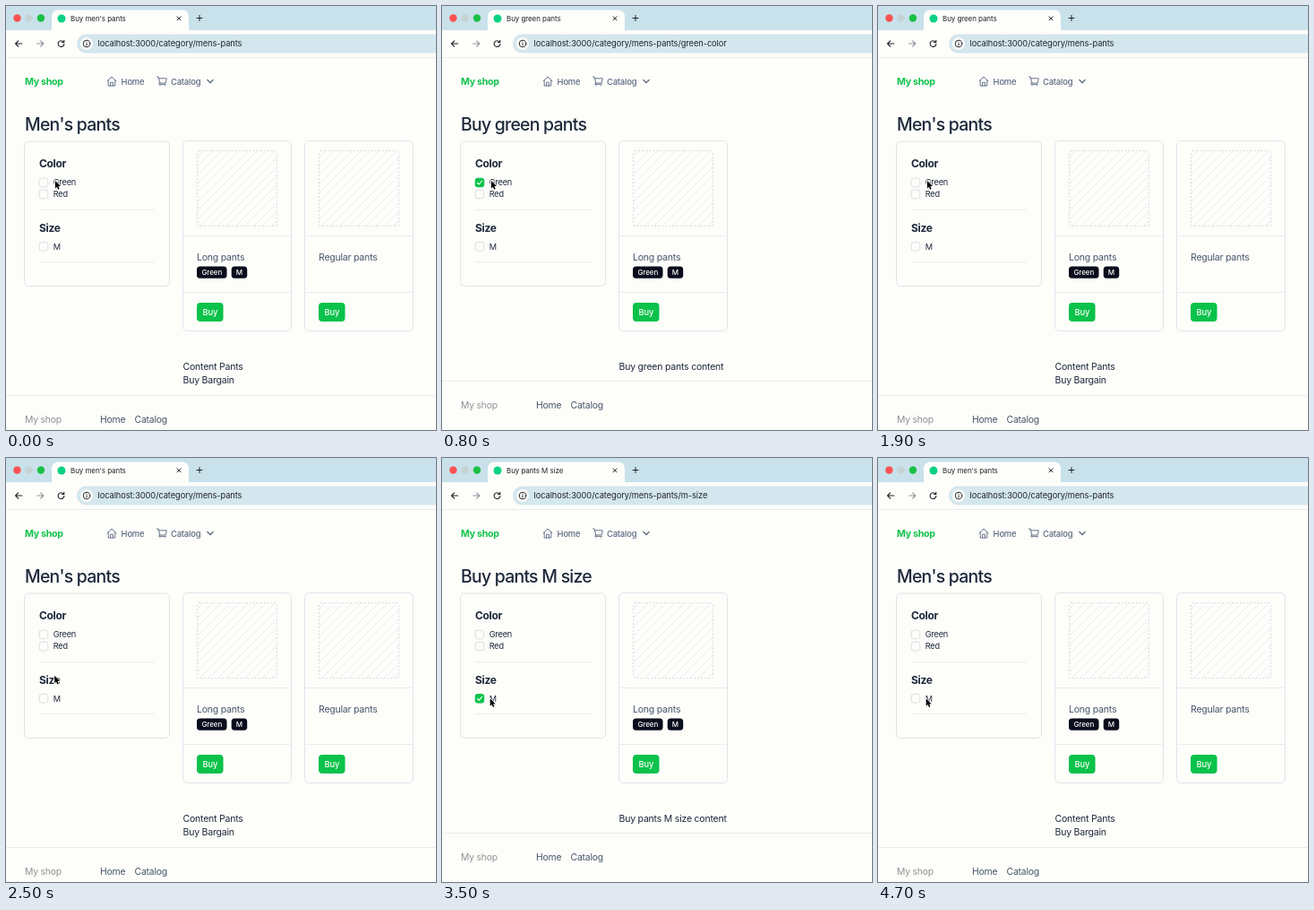
Write an HTML page with a canvas that moves like this. It is 480x473 px and loops after 4800 ms.

```html
<!DOCTYPE html>
<html lang="en">
<head>
<meta charset="utf-8">
<title>Shop filters</title>
<style>
html, body { margin: 0; width: 100%; height: 100%; overflow: hidden; background: #fdfdfa; }
canvas { display: block; width: 480px; height: 473px; }
</style>
</head>
<body>
<canvas id="stage"></canvas>
<script>
const W = 480, H = 473, LOOP = 4800;
const canvas = document.getElementById('stage');
const ctx = canvas.getContext('2d');
const ratio = window.devicePixelRatio || 1;
canvas.width = W * ratio;
canvas.height = H * ratio;

const PAGE = '#fdfdfa', STRIP = '#c9e1eb', FIELD = '#d4e6ee';
const LINE = '#e8ebf0', EDGE = '#dfe4ea';
const CHROME = '#1f2328', INK = '#1e293b', NAV = '#5a6880', SOFT = '#475569', MUTED = '#8f9396';
const GREEN = '#0bc24a', LIGHT = '#fbfdfb';

const PAGES = {
  all: { title: "Buy men's pants", head: "Men's pants", path: '', body: ['Content Pants', 'Buy Bargain'] },
  green: { title: 'Buy green pants', head: 'Buy green pants', path: '/green-color', body: ['Buy green pants content'] },
  size: { title: 'Buy pants M size', head: 'Buy pants M size', path: '/m-size', body: ['Buy pants M size content'] }
};

// [time, value] steps; the last one reached applies
const VIEW = [[0, 'all'], [400, 'green'], [1900, 'all'], [3200, 'size'], [4400, 'all']];
const TITLE = [[0, 'all'], [400, 'green'], [2000, 'all'], [3200, 'size'], [4500, 'all']];
const CHECK = [[0, ''], [300, 'Green'], [1800, ''], [2900, 'M'], [4300, '']];

const at = (steps, t) => steps.filter(s => s[0] <= t).pop()[1];

function text(str, x, y, size, color, weight = 400, gap = -0.02) {
  ctx.font = `${weight} ${size}px Inter, "Open Sans", sans-serif`;
  ctx.letterSpacing = gap * size + 'px';
  ctx.fillStyle = color;
  ctx.fillText(str, x, y);
}

function box(x, y, w, h, r, fill, stroke) {
  ctx.beginPath();
  ctx.roundRect(x, y, w, h, r);
  if (fill) { ctx.fillStyle = fill; ctx.fill(); }
  if (stroke) { ctx.strokeStyle = stroke; ctx.lineWidth = 1; ctx.stroke(); }
}

function dot(x, y, r, color) {
  ctx.beginPath();
  ctx.arc(x, y, r, 0, Math.PI * 2);
  ctx.fillStyle = color;
  ctx.fill();
}

function path(d, color, width = 1, x = 0, y = 0) {
  ctx.save();
  ctx.translate(x, y);
  ctx.strokeStyle = color;
  ctx.lineWidth = width;
  ctx.lineCap = ctx.lineJoin = 'round';
  ctx.stroke(new Path2D(d));
  ctx.restore();
}

function rule(x1, x2, y) {
  ctx.fillStyle = LINE;
  ctx.fillRect(x1, y, x2 - x1, 1);
}

function browser(page, title) {
  ctx.fillStyle = STRIP;
  ctx.fillRect(0, 0, W, 27);
  dot(12.5, 13.5, 4.2, '#fb5252');
  dot(25.5, 13.5, 4.2, '#c6d3d2');
  dot(39, 13.5, 4.2, '#19c043');
  box(51, 4.5, 153, 24, [7, 7, 0, 0], PAGE);
  dot(62, 14, 4.5, '#08d283');
  text(title, 72, 16.8, 8, CHROME, 400, -0.01);
  path('M-2-2L2 2M2-2L-2 2', CHROME, 1, 193, 13.8);
  path('M-3 0H3M0-3V3', CHROME, 1, 216, 13.5);

  path('M3.5 0H-3.5M-.5-3.2L-3.7 0L-.5 3.2', CHROME, 1.1, 14.3, 42);
  path('M-3.5 0H3.5M.5-3.2L3.7 0L.5 3.2', '#8d949c', 1.1, 38.2, 42);
  path('M2.7-2A3.4 3.4 0 1 0 3.4.4M3.3-3.8V-1.5H1', CHROME, 1.1, 61.5, 42);
  box(79, 31.5, 420, 21, 10.5, FIELD);
  dot(90, 42, 7, PAGE);
  path('M3.8 0A3.8 3.8 0 1 1-3.8 0A3.8 3.8 0 1 1 3.8 0M0-.2V1.8M0-1.9V-1.8', CHROME, 1, 90, 42);
  text('localhost:3000/category/mens-pants' + page.path, 102.5, 45.2, 9.25, CHROME, 400, -0.006);
  rule(0, W, 57);
}

function header() {
  text('My shop', 21, 88, 10.7, '#12c24c', 700, -0.03);
  path('M-5-.3L0-5L5-.3M-3.8-1.2V5H3.8V-1.2M-1.4 5V1.2H1.4V5', NAV, 0.9, 118, 84);
  text('Home', 128.6, 87.5, 9.4, NAV, 500);
  path('M-5.5-5H-3.9L-2.2 2H4.2L5.3-3.2H-3.5M-2.2 2Q-3.6 2.3-3.3 3.4H4.4'
    + 'M-2 5H-1.9M3.3 5H3.4', NAV, 0.9, 174, 84);
  text('Catalog', 184, 87.5, 9.4, NAV, 500);
  path('M-3.2-1.6L0 1.6L3.2-1.6', SOFT, 1.2, 228, 84);
}

function option(label, y, checked) {
  const on = checked === label;
  box(37.2, y - 4.8, 9.6, 9.6, 2.5, on ? GREEN : PAGE, on ? GREEN : '#d9dfe2');
  if (on) path('M-2.6.1L-.8 2L2.7-2', '#fff', 1.1, 42, y);
  text(label, 52.7, y + 3.4, 9.2, INK);
}

function filters(checked) {
  box(20.5, 151, 162, 161.5, 5, null, EDGE);
  text('Color', 37, 180.2, 12, INK, 700, -0.03);
  option('Green', 197, checked);
  option('Red', 210, checked);
  rule(37, 166, 227);
  text('Size', 37, 251.7, 12, INK, 700, -0.03);
  option('M', 268.3, checked);
  rule(37, 166, 285);
}

function badge(label, x, w) {
  box(x, 290.5, w, 13.2, 3.5, '#090d1c');
  ctx.textAlign = 'center';
  text(label, x + w / 2, 300, 8, LIGHT, 500, -0.01);
  ctx.textAlign = 'left';
}

function card(x, name, tagged) {
  box(x + 0.5, 150.5, 121, 212, 5, null, EDGE);
  const px = x + 16.5, py = 161.5, pw = 89, ph = 84;
  ctx.save();
  ctx.beginPath();
  ctx.rect(px, py, pw, ph);
  ctx.clip();
  ctx.beginPath();
  for (let s = 7; s < pw + ph; s += 10) {
    ctx.moveTo(px + s, py);
    ctx.lineTo(px + s - ph, py + ph);
  }
  ctx.strokeStyle = '#e9ebf0';
  ctx.lineWidth = 1;
  ctx.stroke();
  ctx.restore();
  ctx.setLineDash([2, 2]);
  box(px, py, pw, ph, 2, null, '#d6dbe2');
  ctx.setLineDash([]);

  rule(x, x + 122, 256);
  text(name, x + 16, 284, 10.5, SOFT);
  if (tagged) {
    badge('Green', 213, 33.5);
    badge('M', 251.7, 17.5);
  }
  rule(x, x + 122, 319);
  box(x + 16, 331, 29.5, 21, 4, GREEN);
  text('Buy', x + 22.6, 344.8, 9.3, LIGHT, 500);
}

function footer(y) {
  rule(0, W, y);
  text('My shop', 21, y + 31.2, 10.4, MUTED);
  text('Home', 105, y + 31.2, 10.4, SOFT);
  text('Catalog', 143.5, y + 31.2, 10.4, SOFT);
}

function cursor(t) {
  const k = Math.min(1, Math.max(0, (t - 2200) / 500));
  const e = k * k * (3 - 2 * k);
  ctx.save();
  ctx.translate(55 - 1.3 * e, 195 + 73.3 * e);
  const arrow = new Path2D('M0 0V8.4L1.9 6.7L3.2 9.7L4.7 9L3.4 6.1H6Z');
  ctx.lineJoin = 'round';
  ctx.strokeStyle = '#fff';
  ctx.lineWidth = 1.4;
  ctx.stroke(arrow);
  ctx.fillStyle = '#000';
  ctx.fill(arrow);
  ctx.restore();
}

function draw(t) {
  const view = at(VIEW, t), page = PAGES[view];
  ctx.setTransform(ratio, 0, 0, ratio, 0, 0);
  ctx.fillStyle = PAGE;
  ctx.fillRect(0, 0, W, H);
  browser(page, PAGES[at(TITLE, t)].title);
  header();
  text(page.head, 21, 138.8, 19.4, INK, 500, -0.038);
  filters(at(CHECK, t));
  card(197, 'Long pants', true);
  if (view === 'all') card(333, 'Regular pants', false);
  page.body.forEach((line, i) => text(line, 197.5, 405.5 + i * 15.8, 10.5, INK));
  footer(view === 'all' ? 434 : 418);
  cursor(t);
}

const start = performance.now();
function tick() {
  draw((performance.now() - start) % LOOP);
  requestAnimationFrame(tick);
}
tick();
</script>
</body>
</html>
```
